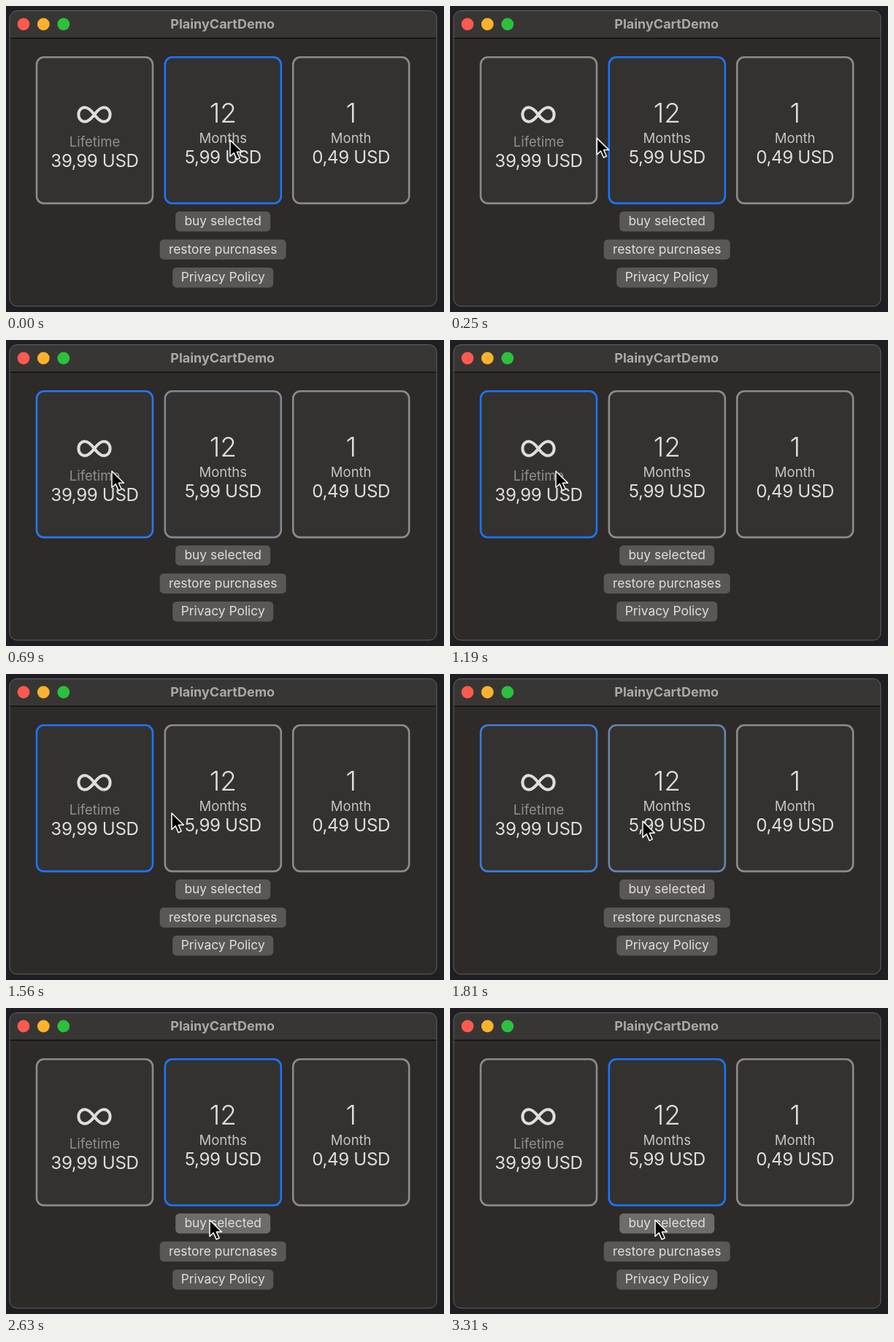
Animation, 600 px wide and 420 px high, one loop 3370 ms. Source, as an HTML page:

```html
<!DOCTYPE html>
<html lang="en">
<head>
<meta charset="utf-8">
<title>Plan picker</title>
<style>
html, body { margin: 0; width: 100%; height: 100%; overflow: hidden; background: #1f1e22; }
svg { display: block; width: 600px; height: 420px; }
text { font-family: Inter, "Liberation Sans", sans-serif; text-anchor: middle; fill: #dfdedc; }
.title { font-size: 18px; font-weight: 700; fill: #aaa9a7; }
.count { font-size: 37px; font-weight: 300; }
.label { font-size: 18.5px; fill: #c6c5c3; }
.dim { fill: #91908e; }
.price { font-size: 24.2px; letter-spacing: -.4px; }
.button text { font-size: 17.4px; }
.button rect { fill: #5a5856; }
.button.pressed rect { fill: #6e6c6b; }
.card rect { fill: #333230; stroke-width: 2.6; }
</style>
</head>
<body>
<svg viewBox="0 0 600 420">
  <rect x="5" y="6.5" width="585" height="405.5" rx="10" fill="#2d2a28"/>
  <path d="M5 44V16.5a10 10 0 0 1 10-10H580a10 10 0 0 1 10 10V44Z" fill="#383634"/>
  <path d="M5 44.3H590" stroke="#121110" stroke-width="1.4"/>
  <rect x="5" y="6.5" width="585" height="405.5" rx="10" fill="none" stroke="#646260"/>
  <circle cx="24" cy="25" r="8.4" fill="#ff5a50"/>
  <circle cx="51.3" cy="25" r="8.4" fill="#fdb22c"/>
  <circle cx="78.8" cy="25" r="8.4" fill="#2ac23c"/>
  <text class="title" x="296.7" y="30.5">PlainyCartDemo</text>

  <g id="cards"></g>
  <path d="M121 149C116 142.2 112.5 139.2 108 139.2C103 139.2 99.4 143.3 99.4 149S103 158.8 108 158.8C112.5 158.8 116 155.8 121 149C126 142.2 129.5 139.2 134 139.2C139 139.2 142.6 143.3 142.6 149S139 158.8 134 158.8C129.5 158.8 126 155.8 121 149Z" fill="none" stroke="#dfdedc" stroke-width="4"/>
  <g id="buttons"></g>
  <path id="cursor" d="M0 0V22.5L5.2 17.6L9.2 26.6L13.2 24.8L9.3 16.2H16.4Z" fill="#000" stroke="#fff" stroke-width="1.5" stroke-linejoin="round"/>
</svg>
<script>
const LOOP = 3370, STEP = 62.5, FADE = 400;
const GRAY = [140, 139, 137], BLUE = [26, 117, 255];
const $ = id => document.getElementById(id);

// center x, count, label, price, baseline shift
const plans = [
  [121.5, "", "Lifetime", "39,99 USD", 5],
  [297.3, "12", "Months", "5,99 USD", 0],
  [472.7, "1", "Month", "0,49 USD", 0],
];
$("cards").innerHTML = plans.map(([x, count, label, price, dy]) => `<g class="card">
  <rect x="${x - 79.5}" y="70.3" width="159" height="200.6" rx="10"/>
  <text class="count" x="${x}" y="160">${count}</text>
  <text class="label ${dy ? "dim" : ""}" x="${x}" y="${188 + dy}">${label}</text>
  <text class="price" x="${x}" y="${216 + dy}">${price}</text></g>`).join("");

const buttons = [["buy selected", 130, 282], ["restore purcnases", 173, 320.5], ["Privacy Policy", 138, 359]];
$("buttons").innerHTML = buttons.map(([name, w, y]) => `<g class="button">
  <rect x="${297.2 - w / 2}" y="${y}" width="${w}" height="27.4" rx="5.5"/>
  <text x="297.2" y="${y + 19.2}">${name}</text></g>`).join("");

// time, x, y of the pointer tip
const path = [
  [0, 307, 184], [60, 307, 184], [375, 145, 180], [1310, 145, 180], [1562.5, 227, 191],
  [1690, 262, 200], [1810, 264, 202], [2062.5, 279, 285], [2190, 279, 291],
  [2630, 279, 291], [2900, 281, 291], [LOOP, 281, 291],
];
const borders = [...document.querySelectorAll(".card rect")];
const buy = document.querySelector(".button");

const clamp = v => Math.max(0, Math.min(1, v));
const ease = v => v * v * (3 - 2 * v);
const fade = (t, start) => ease(clamp((t - start) / FADE));
const mix = k => `rgb(${GRAY.map((g, i) => Math.round(g + (BLUE[i] - g) * k))})`;

function pointer(t) {
  const i = path.findIndex(p => p[0] > t);
  const [t0, x0, y0] = path[i - 1], [t1, x1, y1] = path[i];
  const k = ease((t - t0) / (t1 - t0));
  return [x0 + (x1 - x0) * k, y0 + (y1 - y0) * k];
}

function draw(t) {
  const lifetime = fade(t, 370) - fade(t, 1660);
  [lifetime, 1 - lifetime, 0].forEach((k, i) => borders[i].setAttribute("stroke", mix(k)));
  buy.classList.toggle("pressed", t >= 2300);
  $("cursor").setAttribute("transform", `translate(${pointer(t)})`);
}

const start = performance.now();
function tick() {
  const t = (performance.now() - start) % LOOP;
  draw(Math.floor((t + 3) / STEP) * STEP);
  requestAnimationFrame(tick);
}
tick();
</script>
</body>
</html>
```
